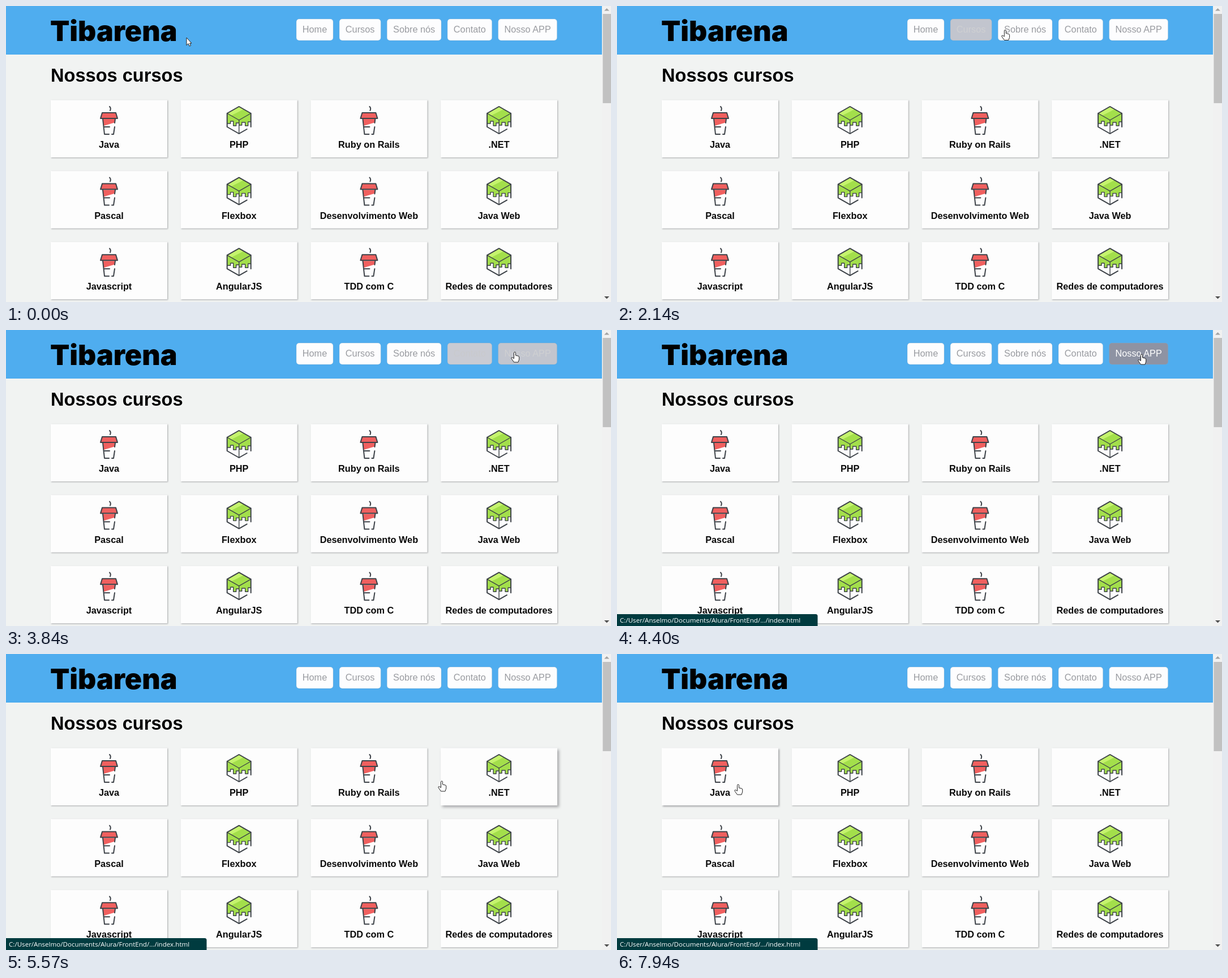
An HTML page for the animation above (8 s loop, 1069 by 524 pixels).

```html
<!DOCTYPE html>
<html lang="pt-BR">
<head>
<meta charset="utf-8">
<title>Nossos cursos</title>
<style>
  html, body { margin: 0; width: 100%; height: 100%; overflow: hidden; background: #f1f3f2; }
  svg { display: block; font-family: "Liberation Sans", Arial, sans-serif; font-size: 16.3px; }
  .logo { font: 900 50px Inter, sans-serif; }
  .heading { font-size: 32.6px; font-weight: bold; }
  .card { font-weight: bold; text-anchor: middle; fill: #0a0a0a; }
  .status { font: 11.6px "Open Sans", "Noto Sans", sans-serif; fill: #fff; }
  .line { fill: none; stroke: #3d4248; stroke-width: 2; stroke-linejoin: round; stroke-linecap: round; }
  .thin { stroke-width: 1.4; }
  .pointer { fill: #fff; stroke: #222; stroke-linejoin: round; }
</style>
</head>
<body>
<svg width="1069" height="524" viewBox="0 0 1069 524">
  <defs>
    <g id="cup">
      <path fill="#f0605f" d="M-12 12H12L15 22H-15ZM-11 23H11V29L-9 35Z"/>
      <path class="line" d="M1 1Q4 4 2 8M-12 12H12L15 22H-15ZM-11 23L-8 50H0M11 23L10 30M-9 37H1M10 37L8 50H5"/>
    </g>
    <g id="cube">
      <path fill="#a3df4b" d="M0 1L21 13V28H16V35H11V29H5V34H0V30H-5V35H-10V27H-15V31H-21V13Z"/>
      <path fill="#c5f36d" d="M0 1L8 6L-14 17L-21 13Z"/>
      <path class="line" d="M14 41L0 49L-21 37V13L0 1L21 13V37"/>
      <path class="line thin" d="M-21 13L0 25L21 13M0 25V49M-21 31H-15V27H-10V35H-5V30H0V34H5V29H11V35H16V28H21"/>
    </g>
  </defs>
  <rect width="1069" height="524" fill="#f1f3f2"/>
  <rect width="1053" height="86" fill="#4fadef"/>
  <text class="logo" x="78" y="62">Tibarena</text>
  <text class="heading" x="79" y="133.5">Nossos cursos</text>
  <g id="content"></g>
  <rect x="1053" width="16" height="524" fill="#f1f1f1"/>
  <rect x="1054.5" y="14" width="14.5" height="158" fill="#c1c1c1"/>
  <path fill="#a3a3a3" d="M1057 8.5H1066L1061.5 4Z"/>
  <path fill="#505050" d="M1057 514H1066L1061.5 518.5Z"/>
  <g id="status">
    <path fill="#003b3f" d="M0 503H351Q354.500 503 354.500 506.500V524H0Z"/>
    <text class="status" x="5" y="518">C:/User/Anselmo/Documents/Alura/FrontEnd/.../index.html</text>
  </g>
  <path id="arrow" class="pointer" d="M0 0V13.500L3 10.500 5 15 7.500 14 5.500 10H9Z"/>
  <path id="hand" class="pointer" d="M-1.500 9V1.500a1.500 1.500 0 0 1 3 0V6L6 7q1.700.4 1.700 2V13L6 18H-1.500L-6 11.500q-.4-2.300 1.600-1.800L-1.500 11.500Z"/>
</svg>
<script>
const LOOP = 8000, TICK = 130, FIRST_TICK = 50, FADE = 500, STATUS_AT = 4270;
const $ = id => document.getElementById(id);
const targets = [];

function add(tag, attributes, text = '') {
  const node = document.createElementNS('http://www.w3.org/2000/svg', tag);
  for (const [name, value] of Object.entries(attributes)) node.setAttribute(name, value);
  node.textContent = text;
  return $('content').appendChild(node);
}

const lerp = (from, to, k) => from + (to - from) * k;
const mix = (from, to, k) => `rgb(${from.map((v, i) => Math.round(lerp(v, to[i], k)))})`;

// Buttons flow from left to right, as wide as their labels.
let buttonX = 513;
for (const label of ['Home', 'Cursos', 'Sobre nós', 'Contato', 'Nosso APP']) {
  const rect = add('rect', { rx: 5, stroke: '#8fa9bd', 'stroke-opacity': .5, 'stroke-width': .6 });
  const text = add('text', { x: buttonX + 10.8, y: 47 }, label);
  const box = { x: buttonX, y: 23, width: text.getComputedTextLength() + 21.6, height: 38 };
  for (const name in box) rect.setAttribute(name, box[name]);
  buttonX += box.width + 11;
  targets.push({ ...box, paint(level) {
    rect.setAttribute('fill', mix([253, 253, 254], [142, 147, 163], level));
    text.setAttribute('fill', mix([153, 155, 160], [255, 255, 255], level));
  } });
}

['Java', 'PHP', 'Ruby on Rails', '.NET', 'Pascal', 'Flexbox', 'Desenvolvimento Web', 'Java Web',
 'Javascript', 'AngularJS', 'TDD com C', 'Redes de computadores'].forEach((label, index) => {
  const column = index % 4, row = Math.floor(index / 4);
  const box = { x: 79 + 229.7 * column, y: 166.5 + 125.6 * row, width: 206, height: 101.5 };
  const center = box.x + box.width / 2;
  const rect = add('rect', { ...box, fill: '#fdfdfd' });
  add('use', { href: column % 2 ? '#cube' : '#cup', x: center, y: box.y + 10.5 });
  add('text', { class: 'card', x: center, y: box.y + 84.5 }, label);
  targets.push({ ...box, paint(level) {
    const offset = lerp(1.5, 3, level);
    rect.style.filter = `drop-shadow(${offset}px ${offset}px ${lerp(1, 2.5, level)}px rgba(90,90,95,.5))`;
  } });
});

// Key points of the pointer: time, x, y
const path = [
  [0, 319, 56], [400, 319, 56], [920, 518, 50], [1480, 584, 45], [1610, 617, 42], [2780, 772, 43],
  [3560, 871, 39], [3820, 899, 39], [4340, 927, 43], [5120, 840, 200], [5510, 770, 225],
  [6330, 533, 232], [7850, 214, 231]
];

function pointerAt(time) {
  const next = Math.max(1, path.findIndex(key => key[0] >= time));
  const [t0, x0, y0] = path[next - 1], [t1, x1, y1] = path[next];
  const k = (time - t0) / (t1 - t0);
  return [lerp(x0, x1, k), lerp(y0, y1, k)];
}

const contains = (box, x, y) =>
  x >= box.x && x <= box.x + box.width && y >= box.y && y <= box.y + box.height;

// The picture is sampled at a steady tick; hover levels fade from one tick to the next.
const steps = [];
let levels = targets.map(() => 0), hovered = -1;
for (let time = FIRST_TICK; time <= path.at(-1)[0]; time += TICK) {
  levels = levels.map((level, n) =>
    Math.min(1, Math.max(0, level + (n === hovered ? TICK : -TICK) / FADE)));
  const [x, y] = pointerAt(time);
  hovered = targets.findIndex(target => contains(target, x, y));
  steps.push({ x, y, hovered, levels });
}

const smooth = k => k * k * (3 - 2 * k);
const show = (id, visible) => { $(id).style.display = visible ? '' : 'none'; };

function draw() {
  const now = performance.now() % LOOP;
  const index = Math.floor((now - FIRST_TICK) / TICK);
  const step = steps[Math.min(steps.length - 1, Math.max(0, index))];
  const overTarget = step.hovered >= 0;
  targets.forEach((target, n) => target.paint(smooth(step.levels[n])));
  for (const id of ['hand', 'arrow']) {
    $(id).setAttribute('transform', `translate(${step.x} ${step.y})`);
    show(id, overTarget === (id === 'hand'));
  }
  show('status', now >= STATUS_AT);
  requestAnimationFrame(draw);
}
draw();
</script>
</body>
</html>
```
